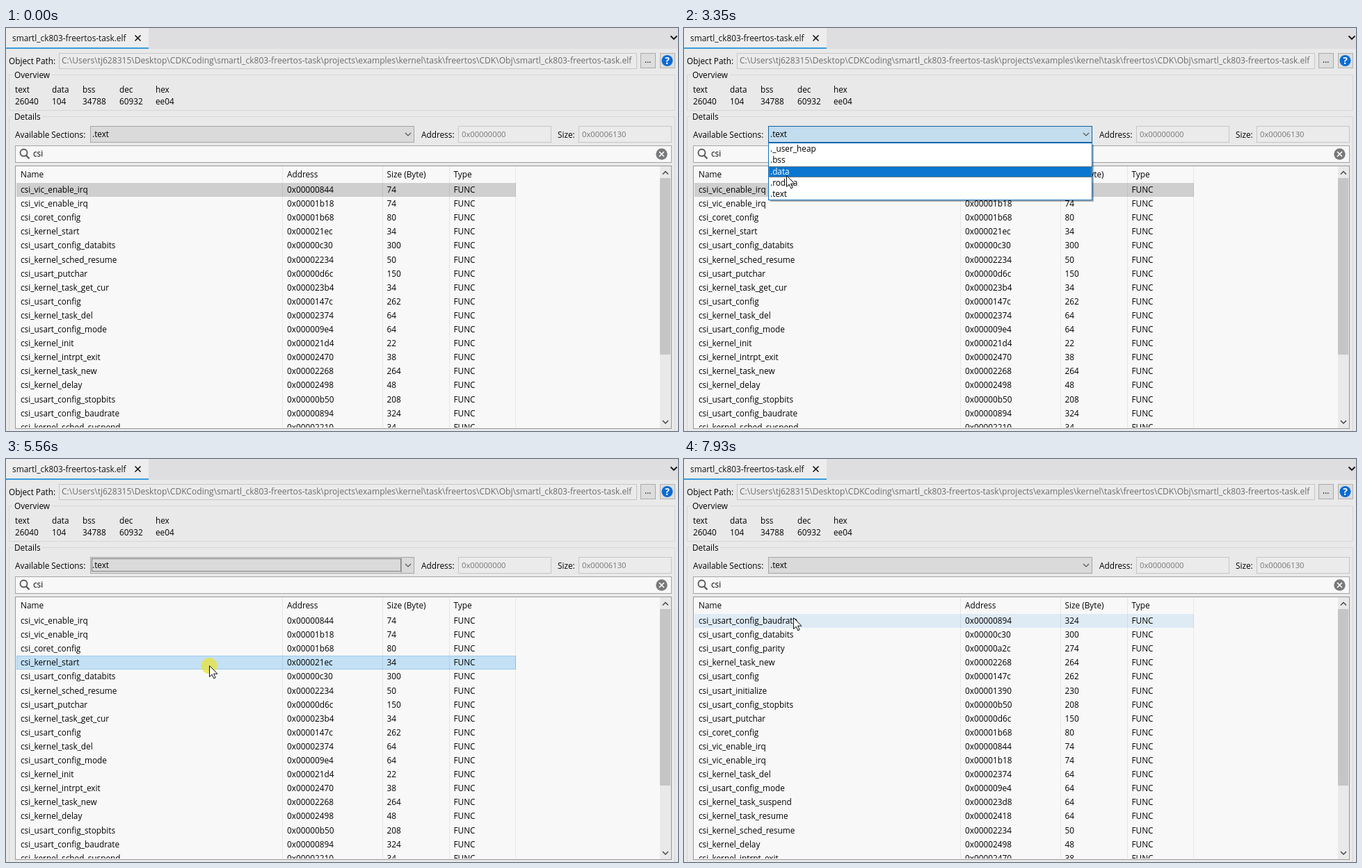
An HTML page that plays this animation: 966 by 580 pixels, repeating every 8 s.

```html
<!DOCTYPE html>
<html lang="en">
<head>
<meta charset="utf-8">
<title>Object viewer</title>
<style>
html, body { margin: 0; width: 100%; height: 100%; overflow: hidden; background: #e9e9e9; }
svg { display: block; width: 966px; height: 580px; }
text { font-family: "Open Sans", "Noto Sans", sans-serif; white-space: pre; }
</style>
</head>
<body>
<svg id="stage" viewBox="0 0 966 580"></svg>
<script>
const LOOP = 8000, ROW = 20.1;

const items = `vic_enable_irq 00000844 74
vic_enable_irq 00001b18 74
coret_config 00001b68 80
kernel_start 000021ec 34
usart_config_databits 00000c30 300
kernel_sched_resume 00002234 50
usart_putchar 00000d6c 150
kernel_task_get_cur 000023b4 34
usart_config 0000147c 262
kernel_task_del 00002374 64
usart_config_mode 000009e4 64
kernel_init 000021d4 22
kernel_intrpt_exit 00002470 38
kernel_task_new 00002268 264
kernel_delay 00002498 48
usart_config_stopbits 00000b50 208
usart_config_baudrate 00000894 324
kernel_sched_suspend 00002210 34
usart_config_parity 00000a2c 274
usart_initialize 00001390 230
kernel_task_suspend 000023d8 64
kernel_task_resume 00002418 64`.split('\n').map(line => {
  const [name, addr, size] = line.split(' ');
  return { name: 'csi_' + name, addr: '0x' + addr, size: +size };
});
const ascending = [...items].sort((a, b) => a.size - b.size);
const descending = [...items].sort((a, b) => b.size - a.size);

const columns = [[15, 397, 'Name'], [398, 541, 'Address'], [541, 637, 'Size (Byte)'], [637, 733, 'Type']];
const sections = ['._user_heap', '.bss', '.data', '.rodata', '.text'];

// Pointer path: time, x, y
const path = [
  [130, 875, 574], [890, 390, 51], [1060, 390, 51], [1630, 242, 152], [1770, 240, 153],
  [1910, 240, 153], [2520, 150, 228], [2600, 150, 228], [2800, 149, 188], [2990, 147, 226],
  [3080, 147, 228], [3350, 147, 213], [3890, 147, 213], [4020, 147, 229], [4100, 147, 229],
  [4310, 147, 238], [4640, 147, 238], [5290, 292, 298], [5600, 292, 298], [6300, 583, 212],
  [7310, 583, 212], [7930, 157, 229]
];
const clicks = [1020, 1840, 4510, 5560, 6310, 6850];

function pointer(t) {
  const i = path.findIndex(p => p[0] > t);
  if (i < 0) return path[path.length - 1].slice(1);
  const [t0, x0, y0] = path[i - 1], [t1, x1, y1] = path[i];
  const u = (t - t0) / (t1 - t0), e = u * u * (3 - 2 * u);
  return [x0 + (x1 - x0) * e, y0 + (y1 - y0) * e].map(Math.round);
}

const rect = (x, y, w, h, fill) => `<rect x="${x}" y="${y}" width="${w}" height="${h}" fill="${fill}"/>`;
const outline = (x, y, x2, y2, stroke, dash = 'none') =>
  `<rect x="${x + .5}" y="${y + .5}" width="${x2 - x - 1}" height="${y2 - y - 1}" fill="none" stroke="${stroke}" stroke-dasharray="${dash}"/>`;
const box = (x, y, x2, y2, fill, stroke, dash) => rect(x, y, x2 - x, y2 - y, fill) + outline(x, y, x2, y2, stroke, dash);
const text = (x, y, s, fill = '#000', size = 11.8) =>
  `<text x="${x}" y="${y}" font-size="${size}" fill="${fill}">${s}</text>`;
const line = (d, stroke, w = 1) => `<path d="${d}" fill="none" stroke="${stroke}" stroke-width="${w}"/>`;
const disc = (x, y, r, fill) => `<circle cx="${x}" cy="${y}" r="${r}" fill="${fill}"/>`;
const inside = ([x, y], x0, y0, x1, y1) => x >= x0 && x < x1 && y >= y0 && y < y1;

function frame() {
  const file = 'smartl_ck803-freertos-task';
  const full = ['C:', 'Users', 'tj628315', 'Desktop', 'CDKCoding', file, 'projects', 'examples',
    'kernel', 'task', 'freertos', 'CDK', 'Obj', file + '.elf'].join('\\');
  const stats = [[13, 'text', '26040'], [66, 'data', '104'], [110, 'bss', '34788'], [163, 'dec', '60932'], [215, 'hex', 'ee04']];
  return rect(0, 0, 966, 580, '#e9e9e9') + rect(0, 0, 966, 30, '#dedee0') + rect(0, 0, 205, 28, '#ededed') +
    rect(0, 28, 205, 2, '#3a9bdc') + text(9, 19, file + '.elf', '#111', 11.85) +
    line('M185.5 10.5l8 8m0-8l-8 8', '#111', 1.6) + line('M955.5 11.5l4.5 4.5 4.5-4.5', '#111', 1.8) +
    text(4, 52, 'Object Path:') + box(76, 36, 907, 59, '#ebebeb', '#c6c6c6') + text(80, 51, full, '#6c6c6c', 12.07) +
    box(912, 36, 934, 58, '#dddddd', '#a9a9a9') + text(918, 50, '...') +
    box(940, 36, 962, 58, '#dddddd', '#b4b4b4') + disc(950.5, 47, 8, '#0b6bd3') +
    '<text x="950.5" y="52" font-size="14" font-weight="700" text-anchor="middle" fill="#fff">?</text>' +
    outline(4, 67, 962, 119, '#d7d7d7') + rect(9, 62, 57, 12, '#e9e9e9') + text(12, 72, 'Overview') +
    stats.map(([x, a, b]) => text(x, 93, a) + text(x, 110, b)).join('') +
    outline(4, 127, 962, 590, '#d7d7d7') + rect(9, 122, 43, 12, '#e9e9e9') + text(12, 132, 'Details') +
    text(13, 158, 'Available Sections:') +
    text(597, 158, 'Address:') + box(650, 141, 784, 165, '#ebebeb', '#c6c6c6') + text(655, 157, '0x00000000', '#747474', 11.2) +
    text(793, 158, 'Size:') + box(823, 141, 957, 165, '#ebebeb', '#c6c6c6') + text(828, 157, '0x00006130', '#747474', 11.2) +
    box(13, 169, 957, 194, '#f8f8f8', '#a4a4a4') + text(39, 185, 'csi') +
    '<circle cx="25.5" cy="179.5" r="5" fill="none" stroke="#555" stroke-width="1.8"/>' + line('M29 183.5l4.5 4.5', '#555', 2.2) +
    disc(942.5, 181.5, 8.2, '#78797b') + line('M939 178l7 7m0-7l-7 7', '#fff', 1.6) +
    box(13, 198, 957, 577, '#f8f8f8', '#989898');
}

function table(t, p, open) {
  const rows = t < 6380 ? items : t < 6920 ? ascending : descending;
  const selected = t < 4640 ? 0 : t >= 5560 && t < 6380 ? 3 : -1;
  const hover = !open && inside(p, 15, 223, 733, 575) ? Math.floor((p[1] - 223) / ROW) : -1;
  let out = '';
  columns.forEach(([x, x2, label]) => {
    if (!open && inside(p, x, 199, x2, 223)) out += rect(x, 199, x2 - x, 24, '#d6e8f5');
    out += text(x < 20 ? 21 : x2 === 541 ? 404 : x + 6.5, 215, label);
  });
  rows.slice(0, 18).forEach((r, i) => {
    const y = Math.round(223 + i * ROW), mid = Math.round(237 + i * ROW);
    if (i === selected) {
      const focus = t >= 1090 && !open;
      out += focus ? box(15, y, 733, y + 20, '#c3e0f5', '#9fcbea') : rect(15, y, 718, 20, i === hover ? '#c3e0f5' : '#cfcfcf');
      if (focus && t < 1910) out += outline(16, y + 1, 732, y + 19, '#4c7f9f');
    } else if (i === hover) out += rect(15, y, 718, 20, '#deebf5');
    out += text(21, mid, r.name) + text(404, mid, r.addr) + text(547.5, mid, r.size) + text(643.5, mid, 'FUNC');
  });
  const grid = line('M397.5 199V575M541.5 199V575M637.5 199V575M732.5 199V575', 'rgba(0,0,0,.07)');
  const thumb = t >= 4580 && t < 4720 ? 58 : 254;
  return `<g clip-path="url(#body)">${out}${grid}</g>` +
    rect(940, 199, 16, 377, '#e9e9e9') + rect(940, 216, 15, thumb, '#c5c5c5') +
    line('M944 210.5l4-4 4 4M944 565l4 4 4-4', '#444', 1.5);
}

function combo(t, p, open) {
  const hot = inside(p, 121, 141, 587, 165);
  const focus = t >= 4640 && t < 5630;
  const [fill, edge] = open ? ['#c3dcee', '#14609c'] : hot ? ['#d1e3f1', '#3b8bc4'] : ['#dadada', '#a6a6a6'];
  let out = box(121, 141, 587, 165, fill, edge) + text(124, 157, '.text') + line('M574 151l4 4 4-4', '#555', 1.2);
  if (focus) out += outline(123, 143, 568, 162, '#222', '1 1') + line('M568.5 142V164', '#a6a6a6');
  return out;
}

function popup([, y]) {
  const at = y < 166 ? 4 : Math.min(4, Math.floor((y - 166) / 16.25));
  const top = i => Math.round(166 + i * 16.25);
  return rect(124, 168, 465, 82, 'rgba(0,0,0,.3)') +
    box(121, 165, 587, 248, '#fff', '#0f70bd') +
    sections.map((s, i) => (i === at ? box(122, top(i), 586, top(i + 1), '#0a76cf', '#d98a3c', '1 1') : '') +
      text(124, top(i) + 12, s, i === at ? '#fff' : '#000')).join('');
}

const arrow = ([x, y]) => `<path transform="translate(${x + .5} ${y - .5})" fill="#fff" stroke="#111"
  d="M0 0V16L3.7 12.6 6.3 18.4 8.7 17.3 6.1 11.7H11.5Z"/>`;

const stage = document.getElementById('stage');
const still = '<clipPath id="body"><rect x="14" y="199" width="926" height="376"/></clipPath>' + frame();
let shown = '';

function draw(now) {
  const t = now % LOOP;
  const p = t < 130 ? [-50, -50] : pointer(t);
  const open = t >= 1910 && t < 4640;
  const click = clicks.some(c => t >= c && t < c + 70);
  const next = table(t, p, open) + combo(t, p, open) + (open ? popup(p) : '') +
    (click ? disc(p[0], p[1] - .5, 11.5, 'rgba(232,227,55,.75)') : '') + arrow(p);
  if (next !== shown) stage.innerHTML = still + (shown = next);
  requestAnimationFrame(() => draw(performance.now() - start));
}
const start = performance.now();
draw(0);
</script>
</body>
</html>
```
